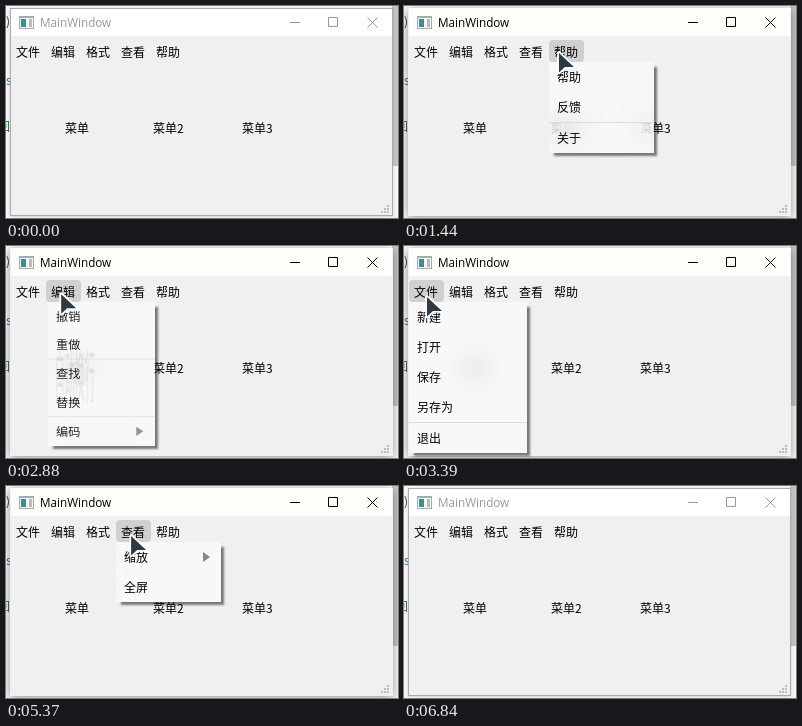
These frames come from a looping animation (392 by 212 pixels, 6930 ms). An HTML page:

```html
<!DOCTYPE html>
<html lang="zh">
<head>
<meta charset="utf-8">
<title>Menu bar</title>
<style>
html, body { margin: 0; width: 100%; height: 100%; overflow: hidden; }
#stage { position: relative; width: 392px; height: 212px; overflow: hidden; background: #f7f7f7;
  font: 12px/16px "Noto Sans CJK SC", "Noto Sans CJK", sans-serif; color: #000; }
#stage div, #stage span, #stage svg { position: absolute; white-space: nowrap; }
#scrollbar { left: 386px; top: 0; width: 6px; height: 160px; background: #c4c4c4; }
#window { left: 4px; top: 2px; width: 381px; height: 206px; border: 1px solid #aaa; background: #f0f0f0;
  box-shadow: 0 1px 4px rgba(0,0,0,.15); }
#titlebar { left: 0; top: 0; width: 381px; height: 27px; background: #fff; color: #999; }
#titlebar span { left: 29px; top: 5px; font: 11.7px/16px "Open Sans", sans-serif; }
.active #window { border-color: #fffefa #f0f0f0 #f0f0f0; box-shadow: 0 2px 9px rgba(0,0,0,.4); }
.active #titlebar { background: #fffefa; color: #000; }
#highlight { top: 34px; width: 35px; height: 22px; border-radius: 4px; background: #d0d0d0; }
#popup { top: 56px; overflow: hidden; background: rgba(255,255,255,.52);
  backdrop-filter: blur(12px); }
#shadow { top: 56px; box-shadow: 4px 4px 2px -1px rgba(0,0,0,.5); }
.menu { left: 0; top: 0; transform-origin: 0 0; }
.menu i { position: absolute; left: 0; width: 100%; height: 1px; background: #dcdcdc; }
.menu b { position: absolute; right: 11px; border: 5px solid transparent; border-left: 7px solid #858585; border-right: 0; }
</style>
</head>
<body>
<div id="stage">
  <span style="left:0;top:7px;color:#333">)</span>
  <span style="left:0;top:66px;color:#2a7fa5">s</span>
  <span style="left:-8px;top:112px;color:#1b8a1b">回</span>
  <div id="scrollbar"></div>
  <div id="window">
    <div id="titlebar">
      <span>MainWindow</span>
      <svg width="381" height="27" fill="none" stroke="currentColor">
        <g stroke="none">
          <path fill="#a3adb1" d="M8 7h15v13H8z"/>
          <path fill="#f6f6f6" d="M9 9h13v10H9z"/>
          <path fill="#3f8d95" d="M10 10h5v8h-5z"/>
          <path fill="#a9c4b8" d="M18 10h3v8h-3z"/>
        </g>
        <path d="M279 13.500h10M317.500 8.500h9v9h-9zM356.500 8.500l10 10m0-10l-10 10"/>
      </svg>
    </div>
    <svg style="left:369px;top:195px" width="10" height="10" fill="#bbb">
      <path d="M7 1h2v2h-2zM4 4h2v2h-2zM7 4h2v2h-2zM1 7h2v2h-2zM4 7h2v2h-2zM7 7h2v2h-2z"/>
    </svg>
  </div>
  <div id="highlight"></div>
  <div id="shadow"></div>
  <div id="popup"></div>
  <svg id="cursor" width="24" height="28" style="left:-3px;top:-3px">
    <path d="M3 3V22.500L9 17H18Z" fill="#2d3943" stroke="#fff" stroke-width="3.500" stroke-linejoin="round" paint-order="stroke"/>
  </svg>
</div>
<script>
const LOOP = 6930, MORPH = 300, OPEN = 860, CLOSE = 5850;
const $ = id => document.getElementById(id);
const stage = $('stage'), popup = $('popup'), shadow = $('shadow'), highlight = $('highlight'), cursor = $('cursor');

// "-" is a separator, a trailing ">" marks a submenu
const menus = [
  { title: '文件', width: 118, items: '新建 打开 保存 另存为 - 退出' },
  { title: '编辑', width: 105, items: '撤销 重做 - 查找 替换 - 编码>' },
  { title: '格式', width: 127, items: '自动换行' },
  { title: '查看', width: 105, items: '缩放> 全屏' },
  { title: '帮助', width: 105, items: '帮助 反馈 - 关于' }
];

// Which menu becomes current at which time
const schedule = [[OPEN, 4], [1680, 3], [2194, 2], [2660, 1], [3050, 0], [4180, 1], [4595, 2], [5085, 3], [5530, 4]];

// Time and position of the pointer tip
const path = [[120, 394, 62], [650, 164, 48], [860, 159, 46], [1440, 155, 47], [1680, 145, 46], [2250, 100, 46],
  [2660, 75, 47], [3050, 40, 49], [3390, 23, 51], [3870, 23, 51], [4180, 40, 51], [4620, 82, 51],
  [5085, 110, 50], [5370, 125, 50], [5530, 145, 50], [6000, 166, 51], [6360, 396, 51]];

const clamp = v => Math.min(1, Math.max(0, v));
const mix = (a, b, p) => a + (b - a) * p;
const easeOut = p => 1 - (1 - p) ** 2;

function add(parent, tag, text, style) {
  const el = document.createElement(tag);
  el.textContent = text;
  Object.assign(el.style, style);
  return parent.appendChild(el);
}

function label(text, x, y) {
  stage.insertBefore(add(stage, 'span', text, { left: x + 'px', top: y - 8 + 'px' }), shadow);
}

menus.forEach((menu, i) => {
  menu.x = 5 + 35 * i;
  label(menu.title, menu.x + 5, 46);
  const el = menu.el = add(popup, 'div', '', { width: menu.width + 'px' });
  el.className = 'menu';
  let y = 0;
  for (const item of menu.items.split(' ')) {
    if (item === '-') {
      add(el, 'i', '', { top: y + 'px' });
      y += 1;
      continue;
    }
    add(el, 'span', item.replace('>', ''), { left: '8px', top: y + 7 + 'px' });
    if (item.endsWith('>')) add(el, 'b', '', { top: y + 10 + 'px' });
    y += 30;
  }
  menu.height = y;
  el.style.height = y + 'px';
});
['菜单', '菜单2', '菜单3'].forEach((text, i) => label(text, [59, 147, 236][i], 122));

function drawPopup(t) {
  const visible = t >= OPEN && t < CLOSE + 130;
  popup.style.display = shadow.style.display = visible ? '' : 'none';
  highlight.style.display = t >= OPEN - 60 && t < CLOSE + 100 ? '' : 'none';
  const step = Math.max(0, schedule.findLastIndex(s => s[0] <= t));
  const [start, index] = schedule[step];
  const to = menus[index], from = step ? menus[schedule[step - 1][1]] : to;
  highlight.style.left = to.x + 'px';
  if (!visible) return;

  const p = easeOut(clamp((t - start) / MORPH));
  const x = mix(from.x, to.x, p), w = mix(from.width, to.width, p);
  const h = step ? mix(from.height, to.height, p) : mix(to.height * .6, to.height, p);
  const opacity = Math.min(step ? 1 : p, 1 - clamp((t - CLOSE) / 130));
  for (const el of [popup, shadow])
    Object.assign(el.style, { left: x + 'px', width: w + 'px', height: h + 'px', opacity });
  for (const menu of menus) {
    // the incoming content appears later than the outgoing one fades
    menu.el.style.opacity = menu === to ? (from === to ? 1 : p * p) : menu === from ? 1 - p : 0;
    menu.el.style.transform = `scale(${w / menu.width}, ${h / menu.height})`;
  }
}

function drawCursor(t) {
  const i = path.findIndex(point => point[0] > t);
  cursor.style.display = i > 0 ? '' : 'none';
  if (i < 1) return;
  const [a, b] = [path[i - 1], path[i]];
  const p = (t - a[0]) / (b[0] - a[0]);
  cursor.style.transform = `translate(${mix(a[1], b[1], p)}px, ${mix(a[2], b[2], p)}px)`;
}

const begin = performance.now();
function frame() {
  const t = (performance.now() - begin) % LOOP;
  stage.className = t >= 780 && t < 6840 ? 'active' : '';
  drawPopup(t);
  drawCursor(t);
  requestAnimationFrame(frame);
}
frame();
</script>
</body>
</html>
```
